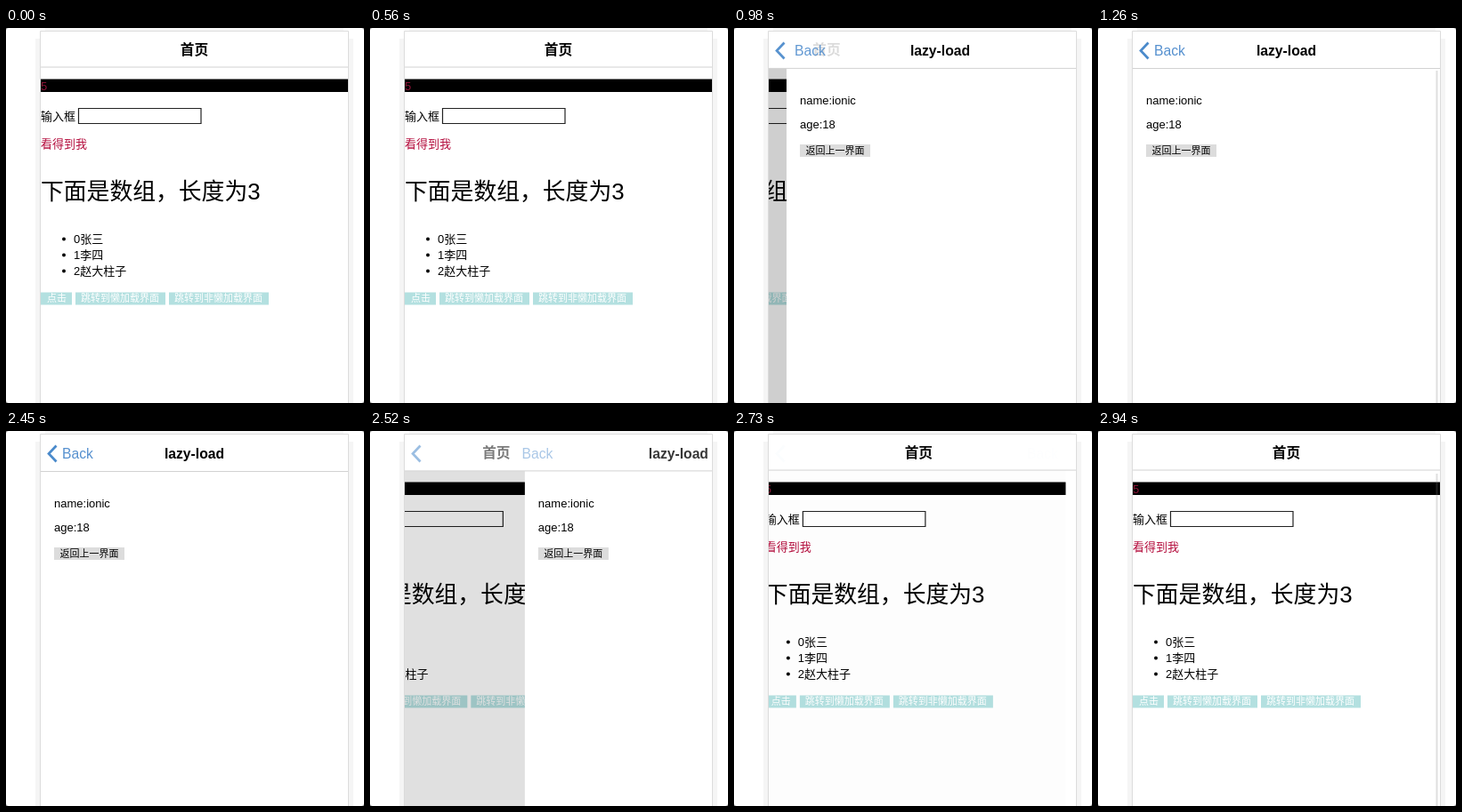
Write an HTML page that moves like this. It is 402 px wide and 422 px high and loops after 3010 ms.

```html
<!DOCTYPE html>
<html lang="zh-CN">
<head>
<meta charset="utf-8">
<title>Page transition</title>
<style>
html, body { margin: 0; width: 100%; height: 100%; overflow: hidden; background: #777; }
svg { display: block; width: 402px; height: 422px; }
text { font: 13px "Liberation Sans", Arial, "Noto Sans CJK SC", "Noto Sans CJK", sans-serif; white-space: pre; }
.head text { font-size: 15.7px; }
.title { font-weight: bold; text-anchor: middle; }
.button { font-size: 11px; }
</style>
</head>
<body>
<svg viewBox="0 0 402 422">
  <defs><clipPath id="screen"><path d="M39 4H384V422H39z"/></clipPath></defs>
  <rect width="402" height="422" rx="3" fill="#fff"/>
  <path d="M33 12H390V422H33z" fill="#f5f5f5"/>
  <path d="M44 0H379V4H44z" fill="#f7f7f7"/>
  <path d="M38.5 422V3.5H384.5V422" fill="#fff" stroke="#dcdcdc"/>
  <g clip-path="url(#screen)">
    <path d="M39 44H384V422H39z" fill="#000"/>
    <g id="home">
      <path d="M39 44H499V422H39z" fill="#fff"/>
      <path d="M39 57.5H499V72H39z"/>
      <text x="39" y="70" fill="#8c1236">5</text>
      <text x="39" y="104">输入框</text>
      <path d="M81.5 90.5H219V107.5H81.5z" fill="none" stroke="#222" stroke-width="1.2"/>
      <text x="39" y="135" fill="#b40c3c">看得到我</text>
      <text x="39" y="193" style="font-size:25.8px">下面是数组，长度为3</text>
      <circle cx="65" cy="237.5" r="2"/><text x="76" y="242">0张三</text>
      <circle cx="65" cy="255.5" r="2"/><text x="76" y="260">1李四</text>
      <circle cx="65" cy="273.5" r="2"/><text x="76" y="278">2赵大柱子</text>
      <path d="M39 297.5H74V311.5H39zM78 297.5H179V311.5H78zM183 297.5H295V311.5H183z" fill="#b3e0e0"/>
      <g fill="#fff">
        <text class="button" x="46" y="308">点击</text>
        <text class="button" x="84" y="308">跳转到懒加载界面</text>
        <text class="button" x="189" y="308">跳转到非懒加载界面</text>
      </g>
    </g>
    <g id="lazy">
      <path d="M39 44H385V422H39z" fill="#fff"/>
      <text x="54" y="86">name:ionic</text>
      <text x="54" y="113">age:18</text>
      <path d="M54 131H133V145H54z" fill="#dcdcdc"/>
      <text class="button" x="60.5" y="142">返回上一界面</text>
    </g>
    <g class="head">
      <path id="bar" fill="#fff" stroke="#d2d2d2"/>
      <text id="homeTitle" class="title" x="211.5" y="30">首页</text>
      <text id="lazyTitle" class="title" x="211.5" y="31">lazy-load</text>
      <path id="arrow" d="M56.5 16.5L48 25.5L56.5 34.5" fill="none" stroke="#4a8acb" stroke-width="2.7"/>
      <text id="back" x="63" y="31" fill="#5590cf">Back</text>
    </g>
    <path id="scrollbar" d="M379.5 48H381.5V422H379.5z" fill="#808080" fill-opacity=".25"/>
  </g>
</svg>
<script>
const LOOP = 3010, STEP = 70, WIDTH = 346, PARALLAX = WIDTH * 0.33;
const el = id => document.getElementById(id);
const bezier = (a, b, s) => 3 * (1 - s) ** 2 * s * a + 3 * (1 - s) * s * s * b + s ** 3;

// cubic-bezier(.36, .66, .04, 1)
function ease(x) {
  if (x <= 0) return 0;
  if (x >= 1) return 1;
  let low = 0, high = 1;
  for (let i = 0; i < 24; i++) {
    const mid = (low + high) / 2;
    if (bezier(0.36, 0.04, mid) < x) low = mid; else high = mid;
  }
  return bezier(0.66, 1, low);
}

function place(id, dx, opacity = 1) {
  el(id).setAttribute("transform", `translate(${dx} 0)`);
  el(id).setAttribute("opacity", opacity);
}

function draw(t) {
  const returning = t > 2450;
  // Share of the second page that is in view
  const shown = returning ? 1 - ease((t - 2440) / 500) : ease((t - 727.5) / 500);
  const hidden = 1 - shown;
  place("home", -PARALLAX * shown, 1 - 0.2 * shown);
  place("lazy", WIDTH * hidden);
  place("homeTitle", -PARALLAX * shown, hidden ** 0.7);
  place("lazyTitle", WIDTH * hidden, Math.sqrt(shown));
  place("arrow", 0, shown ** 1.2);
  place("back", (returning ? 276 : 86) * hidden, shown ** 1.4);
  el("bar").setAttribute("d", `M30 0H394V${44 + 1.5 * shown}H30z`);
  place("scrollbar", 0, (t >= 1260 && t < 2450) || t >= 2940 ? 1 : 0);
}

const start = performance.now();
function tick() {
  const t = (performance.now() - start) % LOOP;
  draw(Math.floor(t / STEP) * STEP);
  requestAnimationFrame(tick);
}
tick();
</script>
</body>
</html>
```
